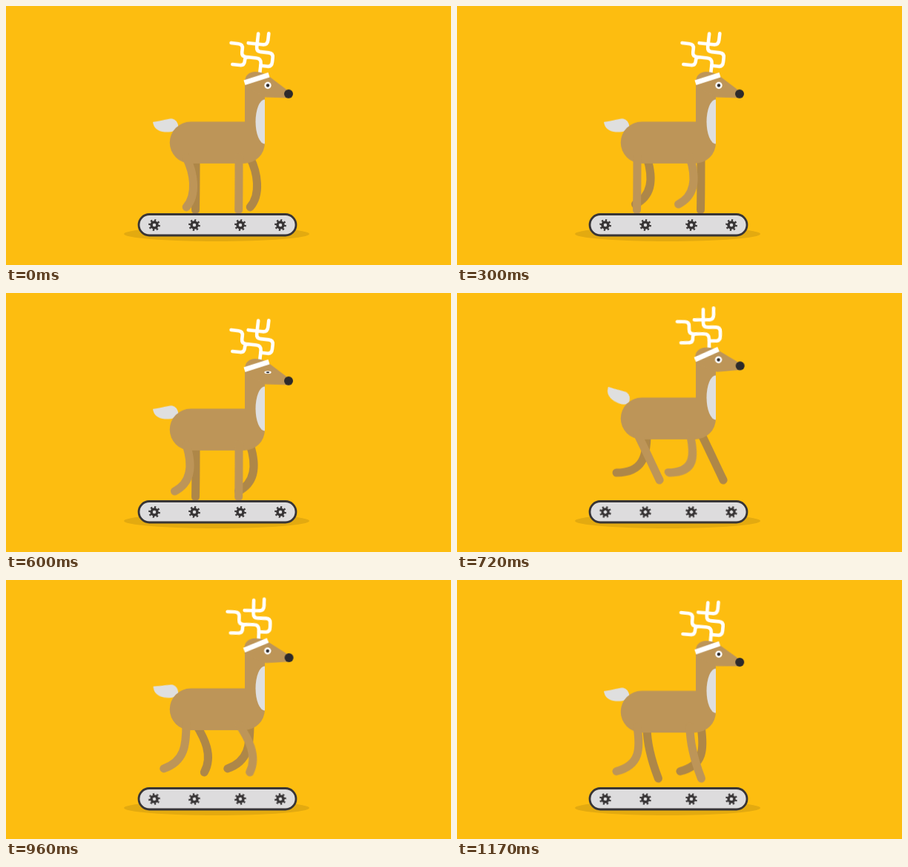
Animation of 600 by 350 pixels, one loop 1.2 s. Source, as an HTML page without scripts:

```html
<!DOCTYPE html>
<html lang="en">
<head>
<meta charset="utf-8">
<title>Deer on a treadmill</title>
<style>
  html, body { margin: 0; width: 100%; height: 100%; overflow: hidden; background: #fdbd10; }
  svg { display: block; width: 600px; height: 350px; }

  .coat { fill: #bd9558; }
  .pale { fill: #dfdfdf; }
  .dark { fill: #2d2a2b; }
  .line { fill: none; stroke: #fff; stroke-width: 4.6; stroke-linecap: round; stroke-linejoin: round; }

  .leg { fill: none; stroke: #bd9558; stroke-width: 11; stroke-linecap: round; animation: stride 1200ms linear infinite; }
  .far { stroke: #ae8748; }
  .offbeat { animation-delay: -300ms; }
  .lean { animation: lean 600ms linear infinite; }

  .deer { animation: bounce 300ms linear infinite; }
  .head { transform-origin: 335px 110px; animation: nod 300ms linear infinite; }
  .tail { transform-origin: 232px 162px; animation: wag 300ms linear infinite; }
  .eye { transform-origin: 353px 107.5px; animation: blink 1200ms linear infinite; }
  .gear { animation: spin 1200ms linear infinite; }

  @keyframes bounce {
    0%, 100% { transform: translateY(0); }
    10% { transform: translateY(-5.7px); }
    20% { transform: translateY(-10px); }
    40% { transform: translateY(-15.2px); }
    50% { transform: translateY(-16.5px); }
    60% { transform: translateY(-15.6px); }
    80% { transform: translateY(-11px); }
    90% { transform: translateY(-7px); }
  }
  @keyframes nod {
    0%, 100% { transform: rotate(0); }
    10%, 90% { transform: rotate(-1.5deg); }
    20%, 80% { transform: rotate(-4.8deg); }
    40%, 60% { transform: rotate(-6.5deg); }
    50% { transform: rotate(-6.8deg); }
  }
  @keyframes wag {
    0%, 90%, 100% { transform: rotate(0); }
    20% { transform: rotate(5deg); }
    40% { transform: rotate(27deg); }
    50% { transform: rotate(32deg); }
    60% { transform: rotate(28deg); }
    80% { transform: rotate(10deg); }
  }
  @keyframes blink {
    0%, 45%, 55%, 100% { transform: scaleY(1); }
    50% { transform: scaleY(.4); }
  }
  @keyframes spin { to { transform: rotate(-360deg); } }

  /* Two strides per loop, drawn from the hip at 0,0 */
  @keyframes stride {
    0%, 100% { d: path("M0 0C10 20 15 50 0 67"); }
    5%, 55% { d: path("M0 0C11 18 24 42 11 65"); }
    10%, 60% { d: path("M0 0C9 18 20 42 30 63"); }
    15%, 65% { d: path("M0 0C5 18 20 45 35 63"); }
    20%, 70% { d: path("M0 0C4 20 14 48 27 67"); }
    22.5%, 72.5% { d: path("M0 0C0 22 8 50 16 70"); }
    25%, 75% { d: path("M0 0C0 23 0 47 0 71"); }
    30%, 80% { d: path("M0 0C0 28 -2 50 -30 60"); }
    35%, 85% { d: path("M0 0C0 30 -5 53 -41 53"); }
    40%, 90% { d: path("M0 0C0 30 0 53 -40 53"); }
    45%, 95% { d: path("M0 0C2 28 4 54 -32 58"); }
    47.5%, 97.5% { d: path("M0 0C4 30 4 52 -29 60"); }
    50% { d: path("M0 0C7 22 10 50 -16 63"); }
  }
  @keyframes lean {
    0%, 50%, 70%, 100% { transform: skewX(0); }
    10% { transform: skewX(8deg); }
    20% { transform: skewX(13deg); }
    30%, 40% { transform: skewX(15deg); }
    45% { transform: skewX(10deg); }
    60% { transform: skewX(3deg); }
  }
</style>
</head>
<body>
<svg viewBox="0 0 600 350">
  <defs>
    <g id="gear" fill="none" stroke="#383536">
      <circle r="4" stroke-width="3.4"/>
      <circle r="6.3" stroke-width="3.2" pathLength="16" stroke-dasharray=".9 1.1"/>
    </g>
  </defs>

  <ellipse cx="284" cy="308" rx="125" ry="10" fill="#e3aa10"/>

  <g class="deer">
    <g transform="translate(256 205)"><path class="leg far offbeat" d="M0 0C0 23 0 47 0 71"/></g>
    <g transform="translate(329 205)"><path class="leg far" d="M0 0C10 20 15 50 0 67"/></g>

    <path class="tail pale" d="M198 157C212 155 217 152.500 224 152.500Q231 154 232.500 163C230 170 222 171 214 170.500C205 170 199 165 198 157Z"/>
    <path class="coat" d="M249 156.500H322V100H349V185A28 28 0 0 1 321 213H249A28.200 28.200 0 0 1 249 156.500Z"/>
    <path class="pale" d="M349 126.500A12.500 30 0 0 0 349 186.500Z"/>

    <g transform="translate(243 205)"><path class="leg" d="M0 0C10 20 15 50 0 67"/></g>
    <g transform="translate(314 205)">
      <g class="lean"><path class="leg offbeat" d="M0 0C0 23 0 47 0 71"/></g>
    </g>

    <g class="head">
      <g class="line" transform="rotate(6.5 335 110) translate(0 15.5)">
        <path d="M297 38.500h10q6 0 6 6v5q0 5.500 6 5.500h14q7 0 7 7v12"/>
        <path d="M302 67h10q6 0 6-6v-2q0-4 4-4"/>
        <path d="M320 36h19q7 0 7-7v-9"/>
        <path d="M332 22v18q0 6 6 6h11q6 0 6 6v6q0 6.500-6 6.500h-9"/>
      </g>
      <path class="coat" d="M322 110V103C322 94 328 89 336 89C345 89 352 93 357 97L378 113L380 124.500L349 123.500Z"/>
      <path fill="#fff" d="M320.500 100.500L353.500 90L355.500 96.500L322.500 107Z"/>
      <g class="eye">
        <circle cx="353" cy="107.500" r="4.700" fill="#fff"/>
        <circle class="dark" cx="353" cy="107.500" r="2.200"/>
      </g>
      <circle class="dark" cx="381" cy="119" r="6"/>
    </g>
  </g>

  <rect x="179" y="281.500" width="212" height="28.500" rx="14.250" fill="#dddcdd" stroke="#383536" stroke-width="2.800"/>
  <g transform="translate(200 296)"><use class="gear" href="#gear"/></g>
  <g transform="translate(254 296)"><use class="gear" href="#gear"/></g>
  <g transform="translate(316 296)"><use class="gear" href="#gear"/></g>
  <g transform="translate(370 296)"><use class="gear" href="#gear"/></g>
</svg>
</body>
</html>
```
